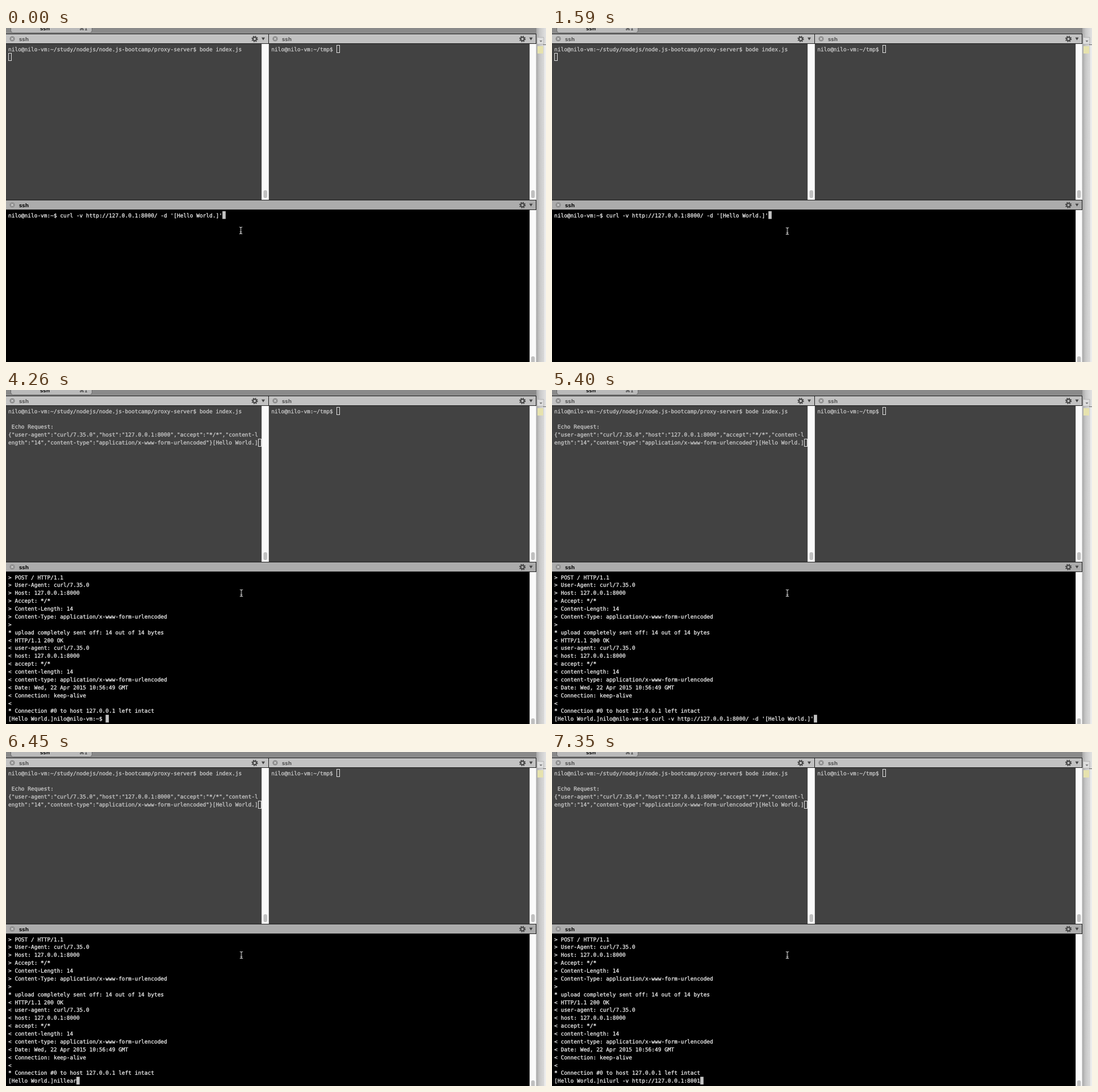
An HTML page for the animation above (8000 ms loop, 951 px wide and 589 px high).

```html
<!DOCTYPE html>
<html lang="en">
<head>
<meta charset="utf-8">
<title>Split terminal</title>
<style>
html, body { margin: 0; width: 100%; height: 100%; overflow: hidden; background: #000; }
svg { display: block; width: 951px; height: 589px; }
text { white-space: pre; text-rendering: geometricPrecision; }
.term { font: 9.49px "DejaVu Sans Mono", monospace; stroke-width: .3; }
.dim { fill: #c8c8c8; stroke: #c8c8c8; }
.lit { fill: #ececec; stroke: #ececec; }
.block { fill: #c3c3c3; }
.hollow { fill: none; stroke: #e2e2e2; }
.title { font: bold 9px "DejaVu Sans", sans-serif; }
.step { visibility: hidden; animation: 8s step-end infinite; }
#before { animation-name: before; }
#after { animation-name: after; }
#line0 { animation-name: line0; }
#line1 { animation-name: line1; }
#line2 { animation-name: line2; }
#line3 { animation-name: line3; }
#line4 { animation-name: line4; }
#pointer { animation: nudge 8s step-end infinite; }
@keyframes before { 0% { visibility: visible } 31.875%, 100% { visibility: hidden } }
@keyframes after { 0% { visibility: hidden } 31.875%, 100% { visibility: visible } }
@keyframes line0 { 0% { visibility: hidden } 31.875% { visibility: visible } 67.5%, 100% { visibility: hidden } }
@keyframes line1 { 0% { visibility: hidden } 67.5% { visibility: visible } 80.625%, 100% { visibility: hidden } }
@keyframes line2 { 0% { visibility: hidden } 80.625% { visibility: visible } 86.25%, 100% { visibility: hidden } }
@keyframes line3 { 0% { visibility: hidden } 86.25% { visibility: visible } 91.875%, 100% { visibility: hidden } }
@keyframes line4 { 0% { visibility: hidden } 91.875%, 100% { visibility: visible } }
@keyframes nudge { 0% { transform: translate(413.5px, 357px) } 1.875%, 100% { transform: translate(414.5px, 358px) } }
</style>
</head>
<body>
<svg viewBox="0 0 951 589">
  <defs>
    <linearGradient id="shade">
      <stop offset="0" stop-color="#a9a9a9"/>
      <stop offset=".35" stop-color="#c8c8c8"/>
      <stop offset="1" stop-color="#e2e2e2"/>
    </linearGradient>
    <g id="close">
      <circle r="4.6" fill="#8c8c8c"/>
      <path d="M-1.8-1.8 1.8 1.8M1.8-1.8-1.8 1.8" stroke="#d6d6d6" stroke-width="1.2"/>
    </g>
    <g id="menu">
      <circle r="4.7" fill="none" stroke="#444" stroke-width="2" stroke-dasharray="1.85 1.841"/>
      <circle r="3.1" fill="none" stroke="#444" stroke-width="2"/>
      <path d="M12-2.5h6l-3 5z" fill="#444"/>
    </g>
    <rect id="thumb" width="6.5" height="14" rx="3.2" fill="#c0c0c0"/>
  </defs>

  <!-- window behind -->
  <rect x="934" width="17" height="589" fill="url(#shade)"/>
  <path d="M936 16.5h11v12h-11" fill="#dedede" stroke="#b4b4b4"/>
  <path d="M939.5 22h5l-2.5 3z" fill="#777"/>
  <path d="M946 29.5h5" stroke="#666"/>
  <rect x="948" y="30" width="3" height="559" fill="#ececec"/>
  <rect x="936" y="32" width="10" height="13" fill="#e6e2ae"/>

  <!-- tab strip -->
  <rect width="934" height="10" fill="#8a8a8a"/>
  <path d="M8.5-1V4.5q0 4 4 4H147.5q4 0 4-4V-1" fill="#bababa" stroke="#686868"/>
  <text class="title" x="60" y="4.2" fill="#151515">ssh</text>
  <text x="129" y="4.2" font-family="DejaVu Sans, sans-serif" font-size="9" fill="#222">⌘1</text>

  <!-- panes -->
  <path d="M0 28h450v275H0zM463 28h459v275H463z" fill="#424242"/>
  <path d="M450 28h13v275h-13zM922 28h12v275h-12zM922 321h12v268h-12z" fill="#fafafa"/>
  <path d="M450.5 28V303M462.5 28V303M922.5 28V303M922.5 321V589M933.5 28V303M933.5 321V589" stroke="#dcdcdc"/>
  <rect y="11" width="934" height="16" fill="#c2c2c2"/>
  <rect y="304" width="934" height="16" fill="#acacac"/>
  <path d="M0 10.5H934M0 27.5H934M0 303.5H934M0 320.5H934M462.5 10V28M933.5 10V28M933.5 303V321" stroke="#1c1c1c"/>
  <use href="#thumb" x="453.5" y="286"/>
  <use href="#thumb" x="924.8" y="286"/>
  <use href="#thumb" x="924.8" y="579"/>
  <use href="#close" x="11" y="19"/>
  <use href="#close" x="474" y="19"/>
  <use href="#close" x="11" y="312"/>
  <use href="#menu" x="438" y="19.3"/>
  <use href="#menu" x="909.5" y="19.3"/>
  <use href="#menu" x="909.5" y="312.3"/>
  <g class="title">
    <text x="23" y="22.5" fill="#555">ssh</text>
    <text x="486" y="22.5" fill="#555">ssh</text>
    <text x="23" y="315.5" fill="#0c0c0c">ssh</text>
  </g>

  <!-- terminal contents -->
  <g id="fixed"></g>
  <g id="before" class="step"></g>
  <g id="after" class="step"></g>
  <g id="line0" class="step"></g>
  <g id="line1" class="step"></g>
  <g id="line2" class="step"></g>
  <g id="line3" class="step"></g>
  <g id="line4" class="step"></g>

  <g id="pointer" fill="none">
    <path d="M-2.5-6Q0-6 0-4V4Q0 6-2.5 6M2.5-6Q0-6 0-4V4Q0 6 2.5 6M-1.5 2.5h3" stroke="#e0e0e0" stroke-width="1.1"/>
  </g>
</svg>
<script>
const NS = 'http://www.w3.org/2000/svg';
const COL = 5.714, ROW = 13.87;
const left = { x: 4, y: 40.7, tone: 'dim', cursor: 'hollow' };
const right = { ...left, x: 467.3 };
const main = { x: 4, y: 333.6, tone: 'lit', cursor: 'block' };

function add(group, tag, attrs, content = '') {
  const node = document.createElementNS(NS, tag);
  for (const key in attrs) node.setAttribute(key, attrs[key]);
  node.textContent = content;
  document.getElementById(group).append(node);
}

function write(group, pane, row, line) {
  add(group, 'text', { class: 'term ' + pane.tone, x: pane.x, y: pane.y + row * ROW }, line);
}

function cursor(group, pane, row, col) {
  const x = pane.x + col * COL, y = pane.y + row * ROW - 10.5;
  const box = pane.cursor === 'hollow'
    ? { x: Math.round(x) + .5, y: Math.round(y) + .5, width: 5, height: 13 }
    : { x, y, width: COL, height: 13.6 };
  add(group, 'rect', { class: pane.cursor, ...box });
}

function prompt(group, pane, row, line) {
  write(group, pane, row, line);
  cursor(group, pane, row, line.length);
}

const host = 'nilo@nilo-vm:';
const body = '[Hello World.]';
const post = `curl -v http://127.0.0.1:8000/ -d '${body}'`;

write('fixed', left, 0, host + '~/study/nodejs/node.js-bootcamp/proxy-server$ bode index.js');
prompt('fixed', right, 0, host + '~/tmp$ ');

cursor('before', left, 1, 0);
prompt('before', main, 0, host + '~$ ' + post);

write('after', left, 2, ' Echo Request:');
write('after', left, 3, '{"user-agent":"curl/7.35.0","host":"127.0.0.1:8000","accept":"*/*","content-l');
prompt('after', left, 4, 'ength":"14","content-type":"application/x-www-form-urlencoded"}' + body);

`> POST / HTTP/1.1
> User-Agent: curl/7.35.0
> Host: 127.0.0.1:8000
> Accept: */*
> Content-Length: 14
> Content-Type: application/x-www-form-urlencoded
>
* upload completely sent off: 14 out of 14 bytes
< HTTP/1.1 200 OK
< user-agent: curl/7.35.0
< host: 127.0.0.1:8000
< accept: */*
< content-length: 14
< content-type: application/x-www-form-urlencoded
< Date: Wed, 22 Apr 2015 10:56:49 GMT
< Connection: keep-alive
<
* Connection #0 to host 127.0.0.1 left intact`
  .split('\n').forEach((line, row) => write('after', main, row, line));

const proxied = 'nilurl -v http://127.0.0.1:8001';
[
  host + '~$ ',
  host + '~$ ' + post,
  'nillear',
  proxied + " -H 'x-destination-url:http://www.yahoo.com'",
  proxied
].forEach((line, i) => prompt('line' + i, main, 18, body + line));
</script>
</body>
</html>
```
